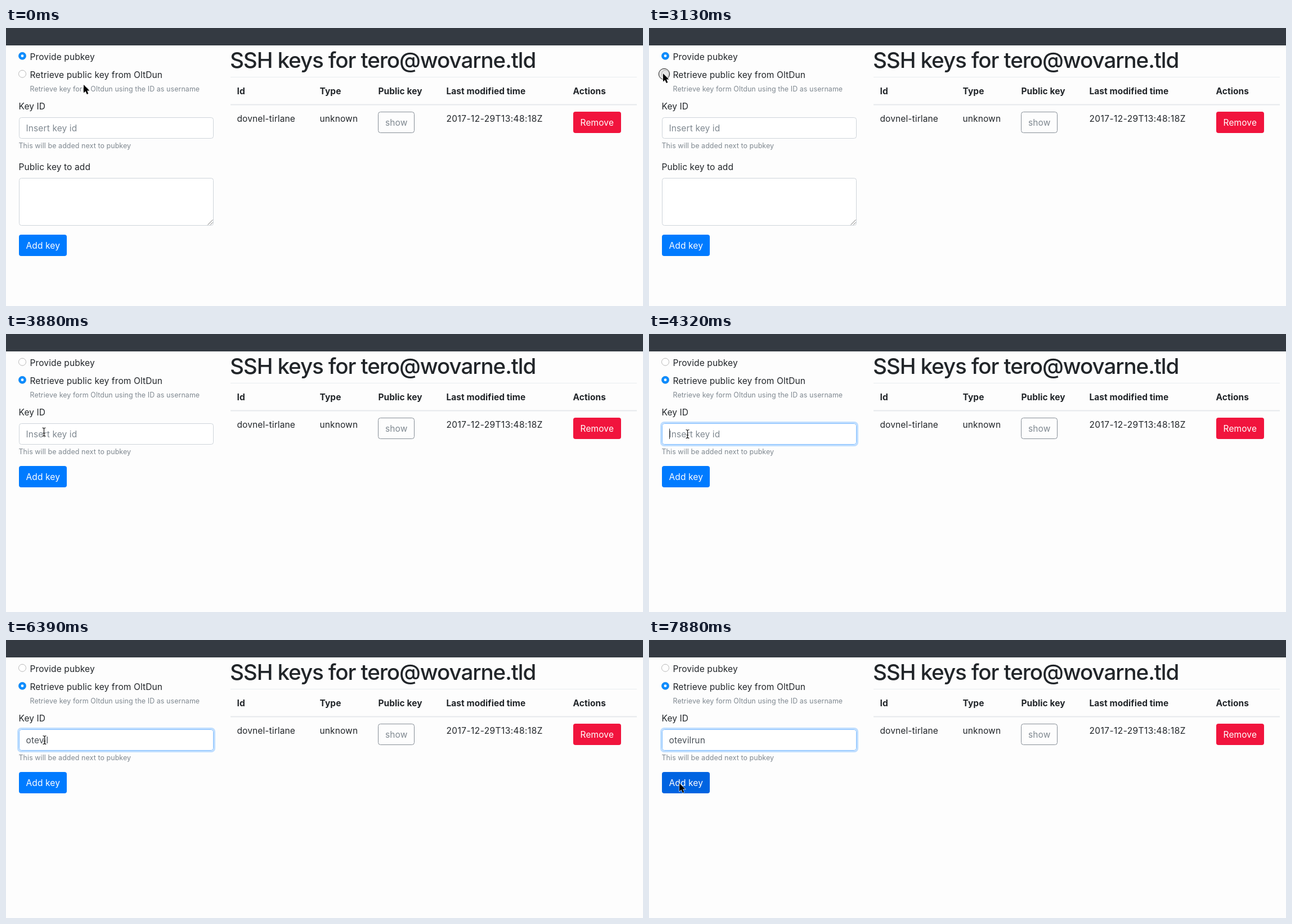
Recreate the animation shown at these times as an HTML page. Size 1132 px wide and 495 px high, loop 8 s.

```html
<!DOCTYPE html>
<html lang="en">
<head>
<meta charset="utf-8">
<title>SSH keys</title>
<style>
html, body { margin: 0; width: 100%; height: 100%; overflow: hidden; background: #fdfdfd; }
svg { display: block; width: 1132px; height: 495px; }
text { font: 400 15.5px Inter, "Open Sans", sans-serif; letter-spacing: .12px; fill: #212529; white-space: pre; }
.title { font-size: 38.6px; font-weight: 500; letter-spacing: -1.1px; font-optical-sizing: none; }
.head { font-weight: 700; letter-spacing: .05px; }
.small { font-size: 12.4px; letter-spacing: .1px; fill: #7f8890; }
.muted { fill: #7f8890; }
.light { fill: #fff; }
.typed { fill: #495057; }
.date { letter-spacing: .42px; }
.field { fill: #fff; stroke: #ced4da; }
.off { fill: #fff; stroke: #b9b9b9; }
</style>
</head>
<body>
<svg viewBox="0 0 1132 495">
  <rect width="1132" height="495" fill="#fdfdfd"/>
  <rect width="1132" height="31" fill="#343a42"/>

  <circle class="off" cx="29" cy="49.7" r="6.5"/>
  <circle class="off" cx="29" cy="81.7" r="6.5"/>
  <g id="radio"><circle cx="29" r="6.8" fill="#0a8cff"/><circle cx="29" r="2.4" fill="#fff"/></g>
  <text x="42.5" y="57">Provide pubkey</text>
  <text x="42.5" y="89">Retrieve public key from OltDun</text>
  <text class="small" x="42.5" y="113">Retrieve key form Oltdun using the ID as username</text>

  <text x="22.5" y="145">Key ID</text>
  <rect id="glow" x="21.5" y="157.5" width="349" height="41" rx="5.5" fill="none" stroke="#bfdeff" stroke-width="3"/>
  <rect id="input" class="field" x="23.5" y="159.5" width="345" height="37" rx="4"/>
  <text id="value" x="35.5" y="183.5"></text>
  <path id="caret" d="M0 168.5V187" stroke="#333"/>
  <text class="small" x="22.5" y="214">This will be added next to pubkey</text>

  <g id="keyArea">
    <text x="22.5" y="252.5">Public key to add</text>
    <rect class="field" x="23.5" y="267.5" width="345" height="84" rx="4"/>
    <path d="M358.5 350.5l9-9M363 350.5l4.5-4.5" stroke="#777" fill="none"/>
  </g>
  <g id="add">
    <rect id="addFace" x="23" y="-19" width="85" height="38" rx="4"/>
    <text class="light" x="35.5" y="5.5">Add key</text>
  </g>

  <text class="title" x="398" y="71">SSH keys for tero@wovarne.tld</text>
  <path d="M399 87.5H1121" stroke="#e9ecef"/>
  <path d="M399 136.5H1121" stroke="#e6e9ec" stroke-width="2"/>
  <g>
    <text class="head" x="410.5" y="117.5">Id</text>
    <text class="head" x="557.5" y="117.5">Type</text>
    <text class="head" x="661.5" y="117.5">Public key</text>
    <text class="head" x="782.5" y="117.5">Last modified time</text>
    <text class="head" x="1007.5" y="117.5">Actions</text>
  </g>
  <text x="410.5" y="167">dovnel-tirlane</text>
  <text x="557.5" y="167">unknown</text>
  <rect x="661.5" y="149.5" width="64" height="37" rx="4" fill="none" stroke="#868e96"/>
  <text class="muted" x="693.8" y="174" text-anchor="middle">show</text>
  <text class="date" x="782.5" y="167">2017-12-29T13:48:18Z</text>
  <rect x="1008" y="149" width="85" height="38" rx="4" fill="#f1143d"/>
  <text class="light" x="1050.3" y="174" text-anchor="middle">Remove</text>

  <g id="pointer">
    <circle id="press" cx="2" cy="1" r="9.7" fill="#888" fill-opacity=".2" stroke="#222"/>
    <path id="arrow" d="M0 0V14.6L3.4 11.5L5.8 17L8.3 15.9L6 10.6H10.4Z" fill="#000" stroke="#fff" stroke-width="1.1" paint-order="stroke"/>
    <g id="beam" fill="none">
      <path d="M-3-7.5Q0-7.5 0-5.5Q0-7.5 3-7.5M0-5.5V5.5M-3 7.5Q0 7.5 0 5.5Q0 7.5 3 7.5M-2 2H2" stroke="#fff" stroke-width="2.4"/>
      <path d="M-3-7.5Q0-7.5 0-5.5Q0-7.5 3-7.5M0-5.5V5.5M-3 7.5Q0 7.5 0 5.5Q0 7.5 3 7.5M-2 2H2" stroke="#111" stroke-width="1.2"/>
    </g>
  </g>
</svg>
<script>
const LOOP = 8000;
const USERNAME = "otevilrun";
const KEY_TIMES = [4770, 5210, 5350, 5950, 6250, 6390, 6690, 6840, 6980];
const el = id => document.getElementById(id);

// Pointer stops: time, x, y
const STOPS = [
  [0, 138, 101], [140, 136, 96], [290, 132, 86], [430, 130, 80],
  [2550, 119, 80], [2700, 82, 81], [2840, 43, 82], [2990, 25, 81],
  [3580, 33, 98], [3730, 57, 143], [3880, 67.5, 174.5], [4030, 68.5, 178],
  [7430, 64, 200], [7580, 58, 232], [7730, 54, 250], [7880, 54, 255]
];

const within = (t, from, to) => t >= from && t < to;
const show = (id, on) => el(id).setAttribute("visibility", on ? "visible" : "hidden");
const move = (id, x, y) => el(id).setAttribute("transform", `translate(${x} ${y})`);

function render(t) {
  const [, x, y] = STOPS.findLast(stop => stop[0] <= t);
  const retrieving = t >= 3280;
  const focused = t >= 4180;
  const overInput = within(t, 3880, 7430);
  const typed = USERNAME.slice(0, KEY_TIMES.filter(k => k <= t).length);

  move("radio", 0, retrieving ? 81.7 : 49.7);
  show("keyArea", !retrieving);
  move("add", 0, retrieving ? 254 : 387);
  el("addFace").setAttribute("fill", t >= 7730 ? "#0064e1" : "#007bff");

  show("glow", focused);
  el("input").style.stroke = focused ? "#80bdff" : "#ced4da";
  el("value").textContent = typed || "Insert key id";
  el("value").setAttribute("class", typed ? "typed" : "muted");
  show("caret", within(t, 4180, 4910));
  move("caret", typed ? 45.5 : 36.5, 0);

  move("pointer", x, y);
  show("arrow", !overInput);
  show("beam", overInput);
  show("press", within(t, 1650, 1800) || within(t, 3130, 3280) || within(t, 4180, 4320));
}

const start = performance.now();
function tick() {
  render((performance.now() - start) % LOOP);
  requestAnimationFrame(tick);
}
tick();
</script>
</body>
</html>
```
